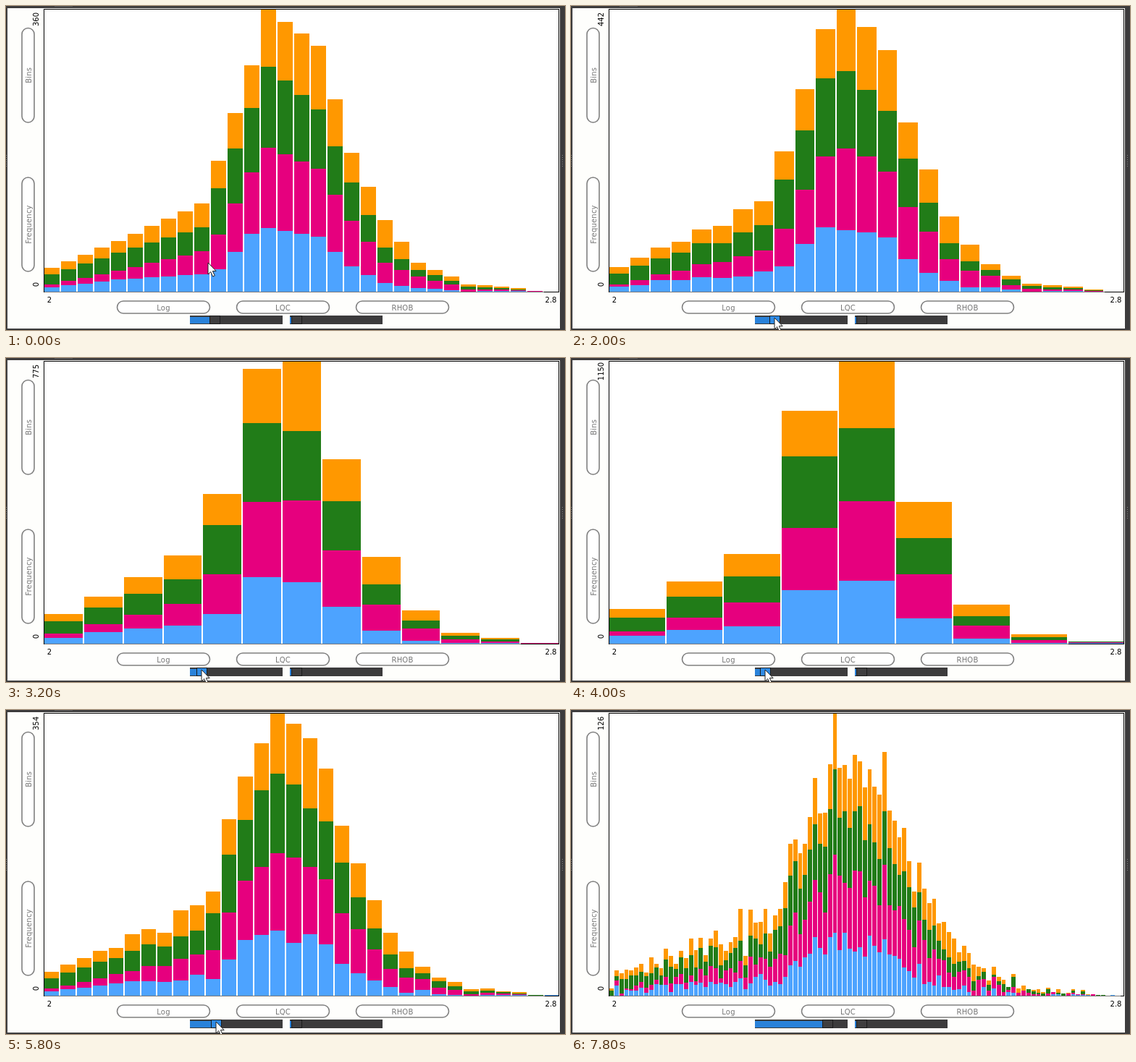
Write an HTML page that moves like this. It is 772 px wide and 448 px high and loops after 8.8 s.

```html
<!DOCTYPE html>
<html lang="en">
<head>
<meta charset="utf-8">
<title>Stacked histogram</title>
<style>
  html, body { margin: 0; width: 100%; height: 100%; overflow: hidden; background: #3c3b3c; }
  svg { display: block; }
  text { font: 10px "DejaVu Sans", sans-serif; text-anchor: middle; }
  .name { letter-spacing: 0.2px; }
  .sharp { shape-rendering: crispEdges; }
</style>
</head>
<body>
<svg id="stage" width="772" height="448" viewBox="0 0 772 448"></svg>
<script>
const LOOP = 8800, STEP = 200;
const LEFT = 53, SPAN = 713, BASE = 395, HEIGHT = 390;
const TRACK = 254, PX_PER_BIN = 0.904;
const COARSE = 31, FINE = 104, CELLS = COARSE * FINE;
const COLORS = ["#4da3ff", "#e6007e", "#217c18", "#ff9800"];

// Shape of the distribution: position, then the height of each series.
const profile = [[0,6,4,14,9], [4,17,12,25,16], [9,24,32,33,33], [10,31,48,64,38],
  [12,80,85,90,59], [13,88,112,112,79], [16,76,94,83,88], [18,35,63,53,41],
  [20,12,28,21,38], [22,5,16,9,10], [25,1,3,4,3], [30,0.5,0,0,0]];
// Bin count and the peak frequency it gives.
const peakCurve = [[9,1150], [12,887], [13,775], [25,442], [31,360], [32,354], [92,142], [104,126]];
// Step, then position.
const thumbPath = [[6,282], [10,275], [16,264], [18,264], [19,262], [23,262], [24,265],
  [25,266], [28,283], [29,284], [33,337], [34,337], [35,348]];
const approach = [[0,279,355], [2,266,384], [4,280,414], [6,288,431]];

// Linear interpolation between keys, held at both ends.
function at(keys, pos) {
  const i = keys.findIndex(k => k[0] > pos);
  if (i < 1) return keys.at(i).slice(1);
  const a = keys[i - 1], b = keys[i], u = (pos - a[0]) / (b[0] - a[0]);
  return a.slice(1).map((v, j) => v + (b[j + 1] - v) * u);
}

function noise(k, s) {
  const v = Math.sin(k * 12.9898 + s * 78.233) * 43758.5453;
  return v - Math.floor(v);
}

// Random whole counts in fine bins, scaled so that coarse bins follow the profile.
function buildCells(s) {
  const perFine = 360 / HEIGHT * COARSE / FINE;
  const counts = Array.from({ length: FINE }, (_, k) => {
    const mean = at(profile, (k + 0.5) * COARSE / FINE - 0.5)[s] * perFine;
    return Math.max(0, Math.round(mean + Math.sqrt(mean) * 3 * (noise(k, s) - 0.5)));
  });
  const cells = Array.from({ length: CELLS }, (_, c) => counts[Math.floor(c / COARSE)]);
  for (let b = 0; b < COARSE; b++) {
    const from = b * FINE, to = from + FINE;
    const sum = cells.slice(from, to).reduce((a, v) => a + v, 0);
    const gain = sum ? at(profile, b)[s] / sum : 0;
    for (let c = from; c < to; c++) cells[c] *= gain;
  }
  return cells;
}
const cells = COLORS.map((_, s) => buildCells(s));

function binned(n) {
  return cells.map(row => {
    const out = new Array(n).fill(0);
    row.forEach((v, c) => out[Math.floor((c + 0.5) * n / CELLS)] += v);
    return out;
  });
}

const stage = document.getElementById("stage");
function set(el, attrs) {
  for (const name in attrs) el.setAttribute(name, attrs[name]);
}
function add(tag, attrs, text) {
  const el = document.createElementNS(stage.namespaceURI, tag);
  set(el, attrs);
  if (text !== undefined) el.textContent = text;
  return stage.appendChild(el);
}
function box(x, y, width, height, fill) {
  return add("rect", { x, y, width, height, fill, class: "sharp" });
}
function label(text, x, y, fill, upright) {
  const place = upright ? { transform: `translate(${x} ${y}) rotate(-90)` } : { x, y };
  return add("text", { ...place, fill }, text);
}
function pill(text, x, y, width, height) {
  add("rect", { x, y, width, height, rx: 8.5, fill: "#fff", stroke: "#808080", "stroke-width": 1.6 });
  const upright = height > width;
  const el = label(text, x + width / 2 + (upright ? 4 : 0), y + height / 2 + (upright ? 0 : 4), "#757575", upright);
  set(el, { class: "name" });
}
function slider(x) {
  box(x, 428, 128, 12, "#3c3b3c");
  const fill = box(x, 430, 0, 9, "#2a82da");
  const thumb = add("rect", { y: 428.5, width: 14, height: 11, stroke: "#1c1c1c", class: "sharp" });
  return (pos, hot) => {
    set(fill, { width: pos - x });
    set(thumb, { x: pos - 0.5, fill: hot ? "#2f8be6" : "#3f3e3f" });
  };
}

box(0, 0, 772, 448, "#3c3b3c");
box(2, 3, 763, 443, "#fefefc");
box(67, 0, 25, 1, "#5a595a");
for (let y = 206; y < 223; y += 3) {
  box(0, y, 1, 1, "#858585");
  box(768, y, 1, 1, "#858585");
}
box(52, 4, 712, 392, "#000");
box(53, 5, 710, 390, "#fff");
const axis = box(LEFT, BASE, 0, 1, "#777");
const bars = COLORS.map(fill => add("path", { fill, class: "sharp" }));

pill("Bins", 22, 30.5, 17, 130.5);
pill("Frequency", 22, 237, 17, 130);
["Log", "LQC", "RHOB"].forEach((text, i) => pill(text, 153.5 + 165 * i, 408, 128, 17));
const peakLabel = label("", 45, 18.5, "#000", true);
label("0", 45, 385, "#000", true);
label("2", 60, 410, "#000");
label("2.8", 752.5, 410, "#000");
const moveThumb = slider(TRACK);
slider(392)(395, false);
const cursor = add("path", {
  d: "M0 0V16L3.7 12.6L6.6 19L9.3 17.8L6.4 11.6H11.2Z",
  fill: "#fff", stroke: "#222", "stroke-width": 1
});

function drawBars(n) {
  const rows = binned(n), pitch = SPAN / n;
  const gap = Math.round(Math.min(2, pitch / 8));
  const edge = i => Math.round(LEFT + i * pitch);
  const sums = rows[0].map((_, i) => rows.reduce((a, row) => a + row[i], 0));
  const scale = HEIGHT / Math.max(...sums);
  const base = new Array(n).fill(0);
  rows.forEach((row, s) => {
    let d = "";
    row.forEach((v, i) => {
      const low = Math.round(BASE - base[i] * scale);
      base[i] += v;
      const top = Math.round(BASE - base[i] * scale);
      const right = Math.min(edge(i + 1) - gap, 763);
      if (low > top) d += `M${edge(i)} ${low}V${top}H${right}V${low}Z`;
    });
    set(bars[s], { d });
  });
  set(axis, { width: SPAN - pitch });
  peakLabel.textContent = Math.round(at(peakCurve, n)[0]);
}

let shown = -1;
function render(ms) {
  const step = Math.floor((ms % LOOP) / STEP);
  if (step === shown) return;
  shown = step;
  const pos = Math.round(at(thumbPath, step)[0]);
  const [x, y] = step < 6 ? at(approach, step) : [pos + 6, 431];
  // The chart follows the slider one step late.
  drawBars(Math.round((at(thumbPath, step - 1)[0] - TRACK) / PX_PER_BIN));
  moveThumb(pos, step >= 5 && step < 39);
  set(cursor, {
    transform: `translate(${Math.round(x)} ${Math.round(y)})`,
    visibility: step < 39 ? "visible" : "hidden"
  });
}

const start = performance.now();
function tick() {
  render(performance.now() - start);
  requestAnimationFrame(tick);
}
tick();
</script>
</body>
</html>
```
